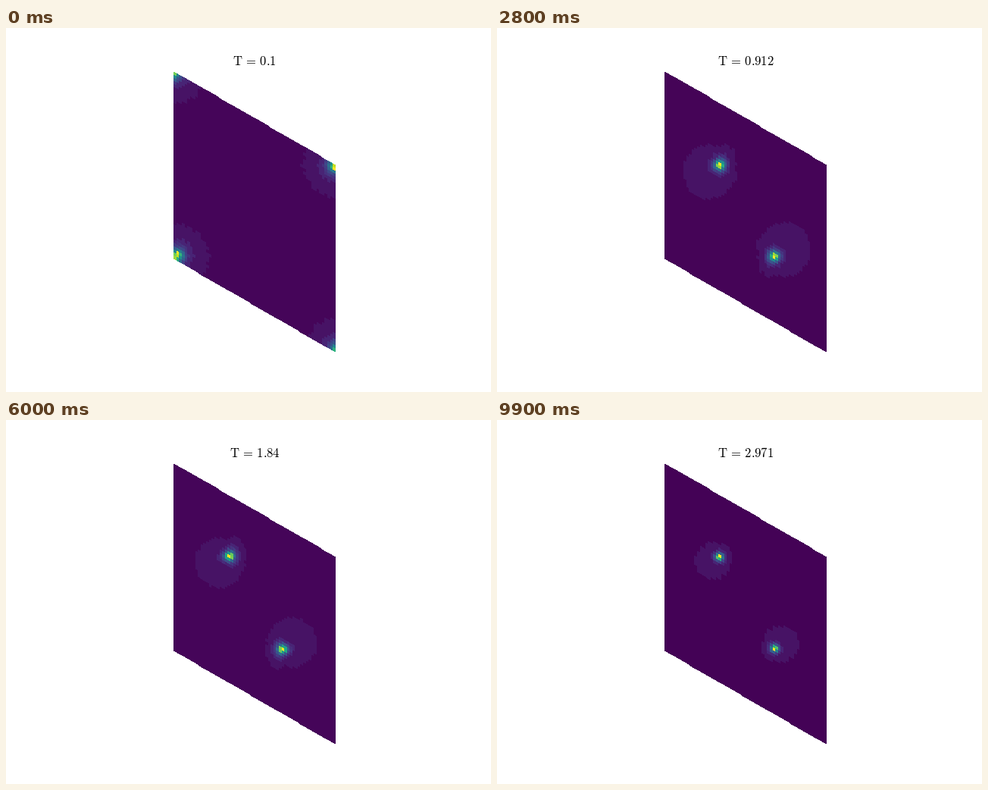
A matplotlib script that plays this animation: 640 by 480 pixels, repeating every 10000 ms.

```python
import numpy as np
import matplotlib.pyplot as plt
from matplotlib.animation import FuncAnimation

plt.rcParams["mathtext.fontset"] = "cm"

N = 60
FRAMES = 100
TAU = 2 * np.pi
B1 = np.array([213.39, 123.2])   # reciprocal lattice vectors in pixels
B2 = np.array([0.0, 246.4])
ORIGIN = np.array([221.31, 57.6])

# Structure factor parameters against step number
STEPS = [0, 2, 5, 9, 13, 17, 28, 39, 60, 84, 99]
KEYS = {
    "k_amp": [0, 0.25, 1, 1, 1, 1, 1, 1, 1, 1, 1],
    "k_width": [0.3, 0.25, 0.12, 0.04, 0.025, 0.016, 0.014, 0.014, 0.01, 0.01, 0.005],
    "power": [1, 1, 1, 1, 1.5, 2, 1.4, 1.3, 1.3, 1.3, 1.3],
    "g_amp": [1, 1, 0.6, 0.3, 0.1, 0, 0, 0, 0, 0, 0],
    "g_width": [0.016, 0.01, 0.003, 0.0006, 0.0005, 0.0005, 0.0005, 0.0005,
                0.0005, 0.0005, 0.0005],
    "g_shift": [-1.5, -1, 0, 1, 1, 1, 1, 1, 1, 1, 1],
    "halo": [0, 0, 0, 0, 0, 0, 36, 43, 32, 34, 24],
    "floor": [0.012, 0.02, 0.03, 0.03, 0.012, 0, 0.008, 0.015, 0.012, 0.01, 0.007],
}


def to_pixels(u, w):
    return (ORIGIN[0] + u * B1[0] + w * B2[0],
            ORIGIN[1] + u * B1[1] + w * B2[1])


def gamma(u, w):
    """Nearest-neighbour sum of the triangular lattice."""
    return np.cos(TAU * u) + np.cos(TAU * w) + np.cos(TAU * (u + w))


idx = np.arange(N)
I, J = np.meshgrid(idx, idx)
U, W = I / N, (J + 1) / N
X, Y = to_pixels((I + 0.5) / N, (J + 0.5) / N)
SIDE = np.where(U + W <= 1, 1, -1)          # which K point a cell belongs to
KX, KY = to_pixels(np.where(SIDE > 0, 20.5, 40.5) / N,
                   np.where(SIDE > 0, 19.5, 39.5) / N)
DX, DY = SIDE * (X - KX), SIDE * (Y - KY)


def noise(step):
    n = np.random.default_rng(step).normal(size=(N, N))
    return (n + n[(N - 2 - J) % N, -I % N]) / np.sqrt(2)


def intensity(step):
    p = {name: np.interp(step, STEPS, vals) for name, vals in KEYS.items()}

    # Peaks at the two K points, wandering slightly in opposite directions
    su = 0.25 / N * np.sin(1.7 * step)
    sw = 0.4 / N * np.sin(2.3 * step)
    energy = 1.5 + gamma(U - SIDE * su, W - SIDE * sw)
    s = p["k_amp"] * (p["k_width"] / (p["k_width"] + energy)) ** p["power"]

    # Peak pair around the zone corner
    if p["g_amp"] > 0:
        gu, gw = 1 / N, p["g_shift"] / N
        for sign in (1, -1):
            e = 3 - gamma(U - sign * gu, W - sign * gw)
            s = s + p["g_amp"] * p["g_width"] / (p["g_width"] + e)
    s = s / s.max()

    # Faint lopsided halo
    r = p["halo"]
    if r > 0:
        d = np.hypot(DX + 0.38 * r, DY - 0.29 * r) / r
        s = np.maximum(s, 0.05 * min(1, r / 22) * np.exp(-0.69 * d ** 6))

    s = s * (1 + 0.07 * noise(step))
    s = s / s.max()
    s = np.where(s < 0.125, np.round(s * 20) / 20, s)
    return np.maximum(s, p["floor"])


def title(step):
    return r"$\mathrm{T\,=\,%s}$" % round(0.1 + 0.029 * step, 3)


fig = plt.figure(figsize=(6.4, 4.8), dpi=100, facecolor="white")
ax = fig.add_axes([0, 0, 1, 1])
ax.set_axis_off()

edge = np.linspace(0, 1, N + 1)
EX, EY = to_pixels(*np.meshgrid(edge, edge))
mesh = ax.pcolormesh(EX, EY, intensity(0), cmap="viridis", vmin=0, vmax=1)
label = ax.text(328, 49.27, title(0), fontsize=12, color="black",
                ha="center", va="baseline")
ax.set_xlim(0, 640)
ax.set_ylim(480, 0)


def update(step):
    mesh.set_array(intensity(step))
    label.set_text(title(step))
    return mesh, label


anim = FuncAnimation(fig, update, frames=FRAMES, interval=100,
                     repeat=True, repeat_delay=0)
plt.show()
```
